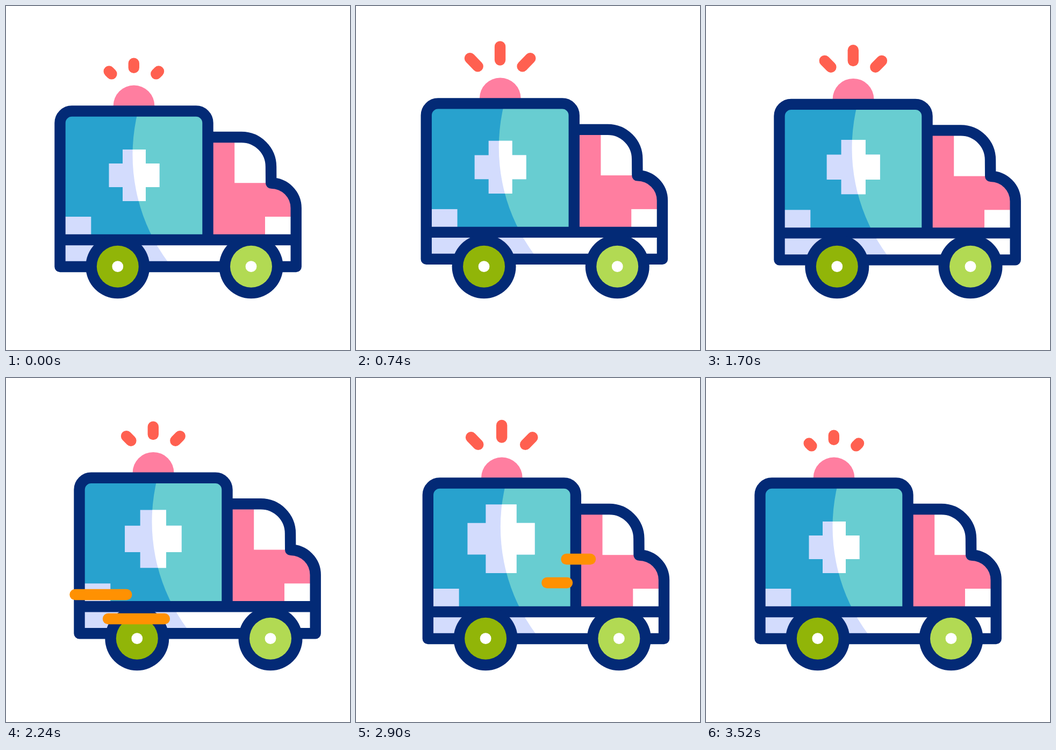
These frames come from a looping animation (640 px wide and 640 px high, 3600 ms). An HTML page with a canvas:

```html
<!DOCTYPE html>
<html lang="en">
<head>
<meta charset="utf-8">
<title>Ambulance</title>
<style>
  html, body { margin: 0; width: 100%; height: 100%; overflow: hidden; background: #fff; }
  canvas { display: block; width: 640px; height: 640px; }
</style>
</head>
<body>
<canvas id="stage" width="640" height="640"></canvas>
<script>
const ctx = document.getElementById('stage').getContext('2d');

const NAVY = '#032a76', BLUE = '#28a2ce', TEAL = '#68cdd1', LAVENDER = '#d3dcfd';
const PINK = '#ff7ea0', RED = '#ff6050', ORANGE = '#ff9102';
const LOOP = 3600, STEP = 20, LAST = 176;

const ease = p => p <= 0 ? 0 : p >= 1 ? 1 : p * p * (3 - 2 * p);

// Eased value at time f, from [time, value] keys.
function track(keys, f) {
  let [t0, v0] = keys[0];
  for (const [t1, v1] of keys) {
    if (f < t1) return v0 + (v1 - v0) * ease((f - t0) / (t1 - t0));
    [t0, v0] = [t1, v1];
  }
  return v0;
}

// Keys that alternate between two values at a fixed spacing.
function alternate(from, to, gap, first, second) {
  const keys = [];
  for (let t = from, i = 0; t <= to; t += gap, i++) keys.push([t, i % 2 ? second : first]);
  return keys;
}

const DRIVE = [[0, 0], [20, -58.6], [40, 36], [140, 36], [170, 0]];
const HOP = alternate(20, 140, 20, 0, -15);
const PULSE = [...alternate(0, 140, 20, 1, 1.35), [LAST, 1]];
const RAY_END = [[0, 0.3], [20, 0], ...alternate(40, 140, 10, 1, 0.48)];
const RAY_START = [[140, 0], [160, 1]];
const RAY_REGROW = [[160, 0], [LAST, 0.3]];

const RAYS = [
  [196.4, 126.4, 180.7, 110.3],
  [237.8, 114.7, 237.8, 87.9],
  [279.3, 126.4, 295, 110.3]
];

// Speed lines: start time, then right end and height of the upper and lower line.
const GUSTS = [
  [0, 375.5, 382, 439, 427],
  [53.4, 479, 387, 433, 434],
  [91, 413.5, 403, 475, 448],
  [140.5, 436, 337, 393, 381]
];
const GUST_LENGTH = 285;

function rect(x0, y0, x1, y1, color) {
  ctx.fillStyle = color;
  ctx.fillRect(x0, y0, x1 - x0, y1 - y0);
}

function disc(x, y, r, color) {
  ctx.fillStyle = color;
  ctx.beginPath();
  ctx.arc(x, y, r, 0, Math.PI * 2);
  ctx.fill();
}

// Part of a round-capped line between fractions a and b of its length.
function trimmedLine(x0, y0, x1, y1, a, b, color) {
  if (b - a < 0.01) return;
  ctx.strokeStyle = color;
  ctx.beginPath();
  ctx.moveTo(x0 + (x1 - x0) * a, y0 + (y1 - y0) * a);
  ctx.lineTo(x0 + (x1 - x0) * b, y0 + (y1 - y0) * b);
  ctx.stroke();
}

function clipped(path, paint) {
  ctx.save();
  ctx.beginPath();
  path();
  ctx.clip();
  paint();
  ctx.restore();
}

function boxPath() {
  ctx.roundRect(100.5, 195.5, 275, 239.5, [22, 22, 0, 0]);
}

function cabPath() {
  ctx.moveTo(375.5, 244);
  ctx.lineTo(438, 244);
  ctx.arc(438, 299, 55, -Math.PI / 2, 0);
  ctx.lineTo(493.2, 329.5);
  ctx.arc(493.2, 376, 46.5, -Math.PI / 2, 0);
  ctx.lineTo(539.7, 485);
}

function crossPath(scale) {
  const x = v => 244 + (v - 244) * scale, y = v => 363 + (v - 363) * scale;
  const bar = (x0, y0, x1, y1) => ctx.rect(x(x0), y(y0), x(x1) - x(x0), y(y1) - y(y0));
  bar(217, 267, 260, 363);
  bar(191.5, 293, 285.5, 337);
}

// Two tones split by the large curved highlight.
function twoTone(x0, y0, x1, y1, shade, light) {
  rect(x0, y0, x1, y1, shade);
  disc(570.5, 277, 335, light);
}

function drawBody(crossScale) {
  clipped(() => ctx.rect(190, 140, 100, 50), () => disc(238, 186, 38.4, PINK));

  clipped(boxPath, () => twoTone(100, 190, 376, 436, BLUE, TEAL));
  clipped(() => crossPath(crossScale), () => twoTone(100, 190, 376, 436, LAVENDER, '#fff'));
  rect(105, 392, 158.3, 430, LAVENDER);

  clipped(() => { cabPath(); ctx.lineTo(375.5, 485); }, () => {
    rect(376, 240, 545, 436, PINK);
    rect(425.2, 240, 500, 329.2, '#fff');
    rect(482, 392, 540, 436, '#fff');
  });
  clipped(() => ctx.rect(100.5, 435, 439, 50), () => twoTone(100, 435, 540, 485, LAVENDER, '#fff'));

  ctx.strokeStyle = NAVY;
  ctx.beginPath();
  boxPath();
  ctx.moveTo(100.5, 435);
  ctx.lineTo(100.5, 485);
  ctx.lineTo(539.7, 485);
  ctx.moveTo(375.5, 435);
  ctx.lineTo(539.7, 435);
  cabPath();
  ctx.stroke();
}

function drawWheel(x, color) {
  disc(x, 484.7, 59.5, NAVY);
  disc(x, 484.7, 39, color);
  disc(x, 484.7, 10.4, '#fff');
}

function drawRays(f) {
  const start = f < 160 ? track(RAY_START, f) : 0;
  const end = track(f < 160 ? RAY_END : RAY_REGROW, f);
  for (const ray of RAYS) trimmedLine(...ray, start, end, RED);
}

function drawGust(f, [begin, ...ends]) {
  for (let i = 0; i < 2; i++) {
    const [x, y] = ends.slice(i * 2);
    const age = f - begin - i * 0.4;
    trimmedLine(x, y, x - GUST_LENGTH, y, ease((age - 10) / 18), ease(age / 18), ORANGE);
  }
}

function draw(now) {
  const f = Math.min(Math.floor((now % LOOP) / STEP), LAST);
  rect(0, 0, 640, 640, '#fff');
  ctx.lineWidth = 20.4;
  ctx.lineCap = ctx.lineJoin = 'round';

  ctx.save();
  ctx.translate(track(DRIVE, f), 0);
  ctx.save();
  ctx.translate(0, track(HOP, f));
  drawRays(f);
  drawBody(track(PULSE, f));
  ctx.restore();
  drawWheel(207.8, '#91b508');
  drawWheel(456, '#b2da53');
  ctx.restore();

  for (const gust of GUSTS) drawGust(f, gust);
}

let origin;
function tick(now) {
  origin ??= now;
  draw(now - origin);
  requestAnimationFrame(tick);
}
requestAnimationFrame(tick);
</script>
</body>
</html>
```
